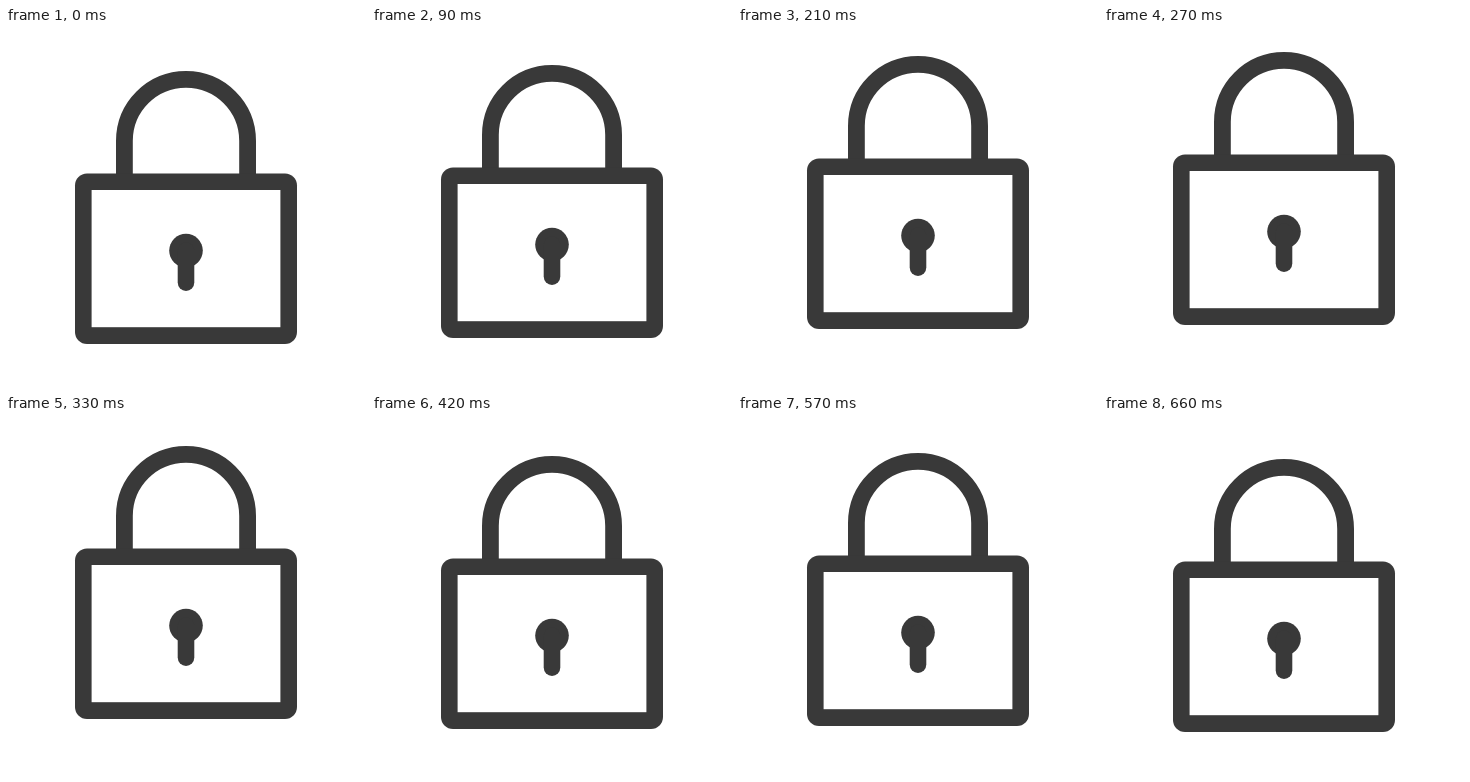
An HTML page that plays this animation: 360 by 360 pixels, repeating every 1.39 s.

```html
<!DOCTYPE html>
<html lang="en">
<head>
<meta charset="utf-8">
<title>Bouncing padlock</title>
<style>
  html, body { margin: 0; width: 100%; height: 100%; overflow: hidden; background: #fff; }
  svg { display: block; width: 100%; height: 100%; }
</style>
</head>
<body>
<svg viewBox="0 0 360 360">
  <g id="lock" fill="#393939" stroke="#393939" stroke-width="0">
    <path d="M118.4 154V112.9a61.6 61.6 0 0 1 123.2 0V154" fill="none" stroke-width="16.8"/>
    <rect x="69" y="145.5" width="222" height="170.5" rx="12"/>
    <rect x="85.6" y="162" width="188.8" height="137.2" fill="#fff"/>
    <circle cx="180" cy="222.6" r="16.8"/>
    <path d="M180 222.6V254.6" stroke-width="16.6" stroke-linecap="round"/>
  </g>
</svg>
<script>
  const LOOP = 1390, STEP = 30;
  // [time in ms, vertical offset], linear in between
  const KEYS = [[0, 0], [270, -19], [450, 0], [540, -8], [660, 0], [LOOP, 0]];
  const lock = document.getElementById('lock');

  function offset(t) {
    const i = KEYS.findIndex(([time]) => time > t);
    const [t0, y0] = KEYS[i - 1], [t1, y1] = KEYS[i];
    return Math.round(y0 + (y1 - y0) * (t - t0) / (t1 - t0));
  }

  function draw(now) {
    const t = Math.floor(now % LOOP / STEP) * STEP;
    lock.setAttribute('transform', `translate(0 ${offset(t)})`);
    requestAnimationFrame(draw);
  }
  requestAnimationFrame(draw);
</script>
</body>
</html>
```
